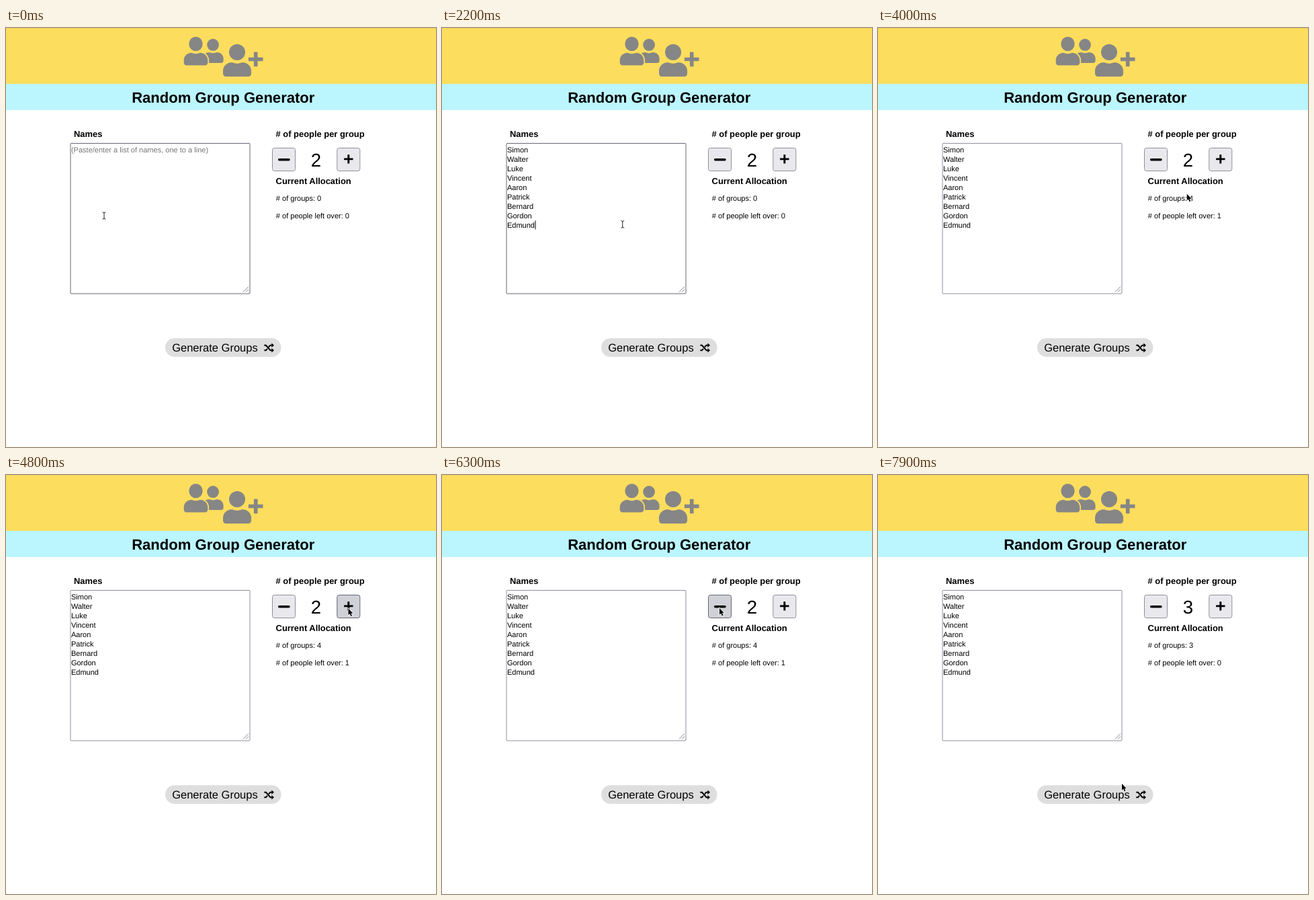
An HTML page that plays this animation: 640 by 623 pixels, repeating every 8 s.

```html
<!DOCTYPE html>
<html lang="en">
<head>
<meta charset="utf-8">
<title>Random Group Generator</title>
<style>
  html, body { margin: 0; width: 100%; height: 100%; overflow: hidden; background: #fff; }
  svg { display: block; width: 640px; height: 623px; }
  text { font-family: "Liberation Sans", Arial, sans-serif; font-size: 11.04px; text-rendering: geometricPrecision; }
  .label { font-size: 12.92px; font-weight: bold; }
  .mid { text-anchor: middle; }
  .line { fill: none; stroke: #000; }
</style>
</head>
<body>
<svg viewBox="0 0 640 623">
  <defs>
    <g id="person">
      <circle cx="224" cy="128" r="128"/>
      <path d="M313.6 288h-16.7c-22.2 10.2-46.9 16-72.9 16s-50.6-5.8-72.9-16h-16.7C60.2 288 0 348.2 0 422.4V464c0 26.5 21.5 48 48 48h352c26.5 0 48-21.5 48-48v-41.6c0-74.2-60.2-134.4-134.4-134.4z"/>
    </g>
  </defs>

  <rect width="640" height="83" fill="#fcdd5d"/>
  <rect width="640" height="1" fill="#f0d35d"/>
  <rect y="83" width="640" height="39" fill="#bbf6ff"/>
  <g fill="#868686">
    <use href="#person" transform="translate(292.5 16) scale(.0695 .0705)"/>
    <use href="#person" transform="translate(264.7 13) scale(.0795 .083)" stroke="#fcdd5d" stroke-width="44" paint-order="stroke"/>
    <use href="#person" transform="translate(323 24) scale(.0938 .0942)" stroke="#fcdd5d" stroke-width="20" paint-order="stroke"/>
    <path d="M371.7 38.5v16M363.7 46.5h16" stroke="#868686" stroke-width="5.6" stroke-linecap="square"/>
  </g>
  <text class="mid" x="323.3" y="111" font-size="22" style="font-size:22.08px;font-weight:bold">Random Group Generator</text>

  <text class="label" x="101" y="162.3">Names</text>
  <rect id="area" x="96" y="171.5" width="267" height="223.5" rx="1" fill="#fff"/>
  <path class="line" d="M353 392.5l8-8M357 392.5l4-4" style="stroke:#777;stroke-width:.9"/>
  <text id="hint" x="96.9" y="184.5" fill="#757575">(Paste/enter a list of names, one to a line)</text>
  <g id="names"></g>
  <rect id="caret" width="1" height="13" fill="#000"/>

  <text class="label" x="401.6" y="162.3"># of people per group</text>
  <g id="minus">
    <rect x="396.5" y="178.5" width="34" height="34" rx="3"/>
    <path class="line" d="M406.7 195.7h14.2" stroke-width="3.6" stroke-linecap="round"/>
  </g>
  <g id="plus">
    <rect x="492.8" y="178.5" width="34" height="34" rx="3"/>
    <path class="line" d="M509.8 188.2v13.4M503.1 194.9h13.4" stroke-width="2.9"/>
  </g>
  <text id="size" class="mid" x="461.5" y="205.8" style="font-size:27.6px"></text>
  <text class="label" x="401.6" y="232">Current Allocation</text>
  <text id="groups" x="401.8" y="257.4"></text>
  <text id="left" x="401.8" y="282.8"></text>

  <rect x="237" y="461.3" width="172.5" height="27.7" rx="13.8" fill="#dedede"/>
  <text x="247.2" y="481.4" style="font-size:16.5px">Generate Groups</text>
  <g class="line" stroke-width="2">
    <path d="M384.3 471.8h2.6l6.6 7.4h2.2M384.3 479.2h2.6l2.1-2.4M391 474.3l2.5-2.5h2.2"/>
    <path d="M395.3 468.6l3.7 3.2-3.7 3.2zM395.3 476l3.7 3.2-3.7 3.2z" fill="#000" stroke="none"/>
  </g>

  <g id="beam" class="line">
    <path d="M-2.4-5.2Q0-5.2 0-3.8 0-5.2 2.4-5.2M0-4V4M-2.4 5.2Q0 5.2 0 3.8 0 5.2 2.4 5.2" stroke="#fff" stroke-width="2.4"/>
    <path d="M-2.4-5.2Q0-5.2 0-3.8 0-5.2 2.4-5.2M0-4V4M-2.4 5.2Q0 5.2 0 3.8 0 5.2 2.4 5.2" stroke="#222"/>
  </g>
  <path id="arrow" d="M0 0v9.8l2.2-2 1.6 3.7 1.7-.7-1.6-3.6h3z" stroke="#fff" stroke-width="1.4" paint-order="stroke"/>
</svg>

<script>
const LOOP = 8000, STEP = 100;
const $ = id => document.getElementById(id);
const people = ["Simon", "Walter", "Luke", "Vincent", "Aaron", "Patrick", "Bernard", "Gordon", "Edmund"];
const LINE = 14.02;

$("names").innerHTML = people.map((name, i) =>
  `<text x="96.9" y="${184.6 + i * LINE}">${name}</text>`).join("");

// time, x, y of the pointer
const path = [
  [0, 146, 279], [300, 149.5, 271.5], [1800, 149.5, 271.5], [2700, 435.5, 320.5],
  [2900, 435.5, 320.5], [3700, 450.5, 253], [3800, 458, 248.5], [3900, 458, 248.5],
  [4800, 509.5, 198.5], [5600, 509.5, 198.5], [5700, 462, 199.5], [5900, 415, 199],
  [6200, 413, 199], [6300, 413, 198], [6400, 413, 198], [7000, 508.5, 196],
  [7400, 508.5, 196], [7900, 363, 459]
];
// time, people per group
const sizes = [[0, 2], [5100, 3], [6100, 2], [7300, 3]];
const PASTE = 1900, COUNTED = 2900, BLUR = 2700;

const within = (t, from, to) => t >= from && t < to;
const show = (el, on) => el.setAttribute("visibility", on ? "visible" : "hidden");
const setText = (id, value) => { if ($(id).textContent !== value) $(id).textContent = value; };

function pointerAt(t) {
  const next = path.findIndex(p => p[0] > t);
  if (next < 0) return path.at(-1).slice(1);
  const [t0, x0, y0] = path[next - 1], [t1, x1, y1] = path[next];
  const k = (t - t0) / (t1 - t0), e = k * k * (3 - 2 * k);
  return [x0 + (x1 - x0) * e, y0 + (y1 - y0) * e];
}

function paint(rect, hover, pressed) {
  rect.setAttribute("stroke", pressed ? "#484851" : hover ? "#676774" : "#8f8f9d");
  if (rect.id !== "area") rect.setAttribute("fill", pressed ? "#b1b1b9" : hover ? "#d0d0d7" : "#e9e9ed");
}

function render(t) {
  const [x, y] = pointerAt(t);
  const inside = (left, top, right, bottom) => x > left && x < right && y > top && y < bottom;
  const overArea = inside(96, 171, 363, 395);
  const overText = overArea || inside(453, 180, 470, 212);

  for (const [id, on] of [["beam", overText], ["arrow", !overText]]) {
    $(id).setAttribute("transform", `translate(${x} ${y})`);
    show($(id), on);
  }
  paint($("area"), overArea, false);
  paint($("minus").firstElementChild, inside(396, 178, 431, 213), within(t, 6000, 6100));
  paint($("plus").firstElementChild, inside(492, 178, 527, 213), within(t, 5000, 5100) || within(t, 7200, 7300));

  const pasted = t >= PASTE;
  show($("hint"), !pasted);
  show($("names"), pasted);
  show($("caret"), within(t, 200, 700) || within(t, 1300, BLUR));
  $("caret").setAttribute("x", pasted ? 138.5 : 97.2);
  $("caret").setAttribute("y", 174.2 + (pasted ? (people.length - 1) * LINE : 0));

  const size = sizes.findLast(s => s[0] <= t)[1];
  const total = t >= COUNTED ? people.length : 0;
  setText("size", String(size));
  setText("groups", `# of groups: ${Math.floor(total / size)}`);
  setText("left", `# of people left over: ${total % size}`);
}

const start = performance.now();
function tick() {
  const t = (performance.now() - start) % LOOP;
  render(Math.floor(t / STEP) * STEP);
  requestAnimationFrame(tick);
}
tick();
</script>
</body>
</html>
```
